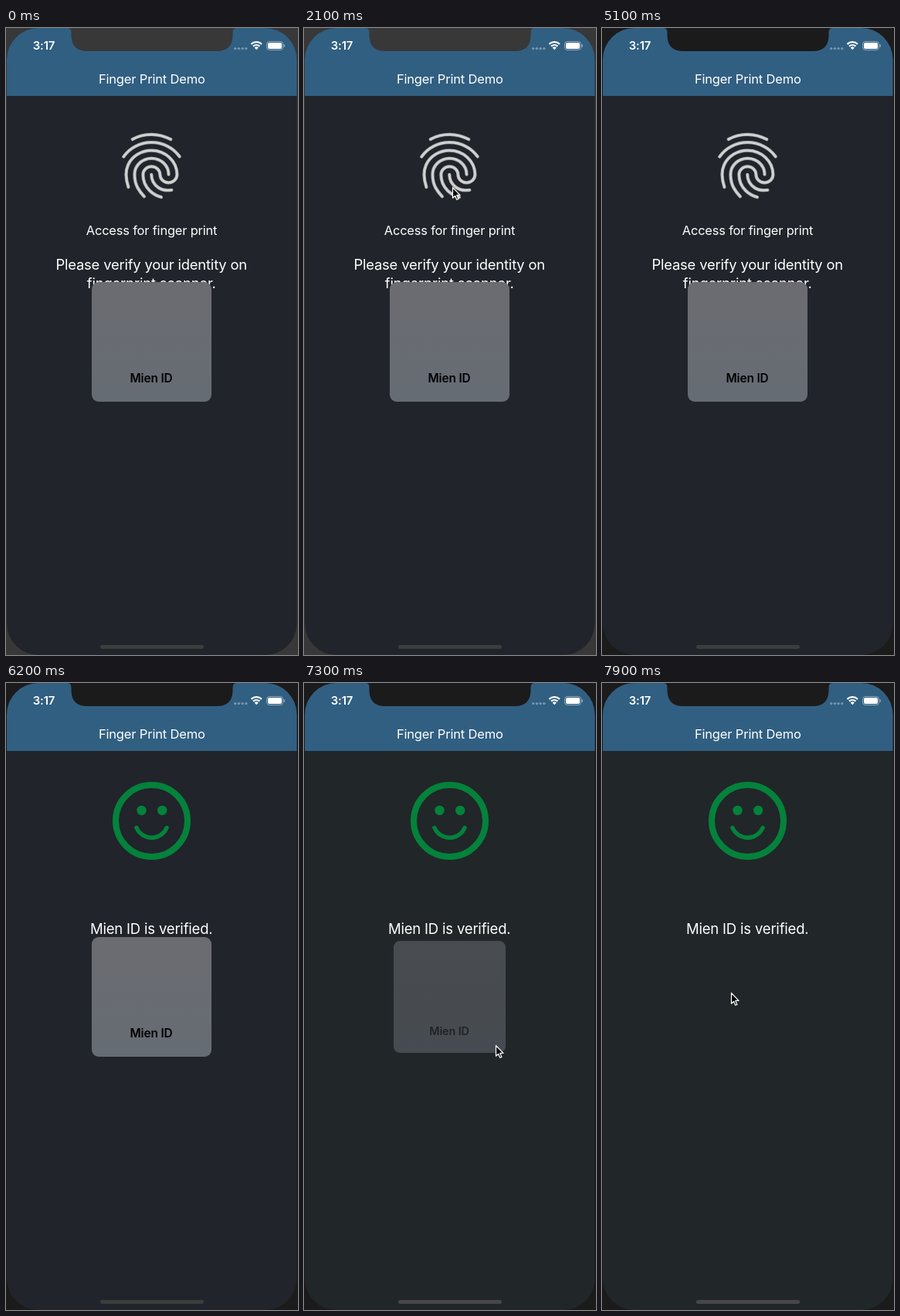
These frames come from a looping animation (378 px wide and 812 px high, 8000 ms). An HTML page with a canvas:

```html
<!DOCTYPE html>
<html lang="en">
<head>
<meta charset="utf-8">
<title>Finger Print Demo</title>
<style>
  html, body { margin: 0; width: 100%; height: 100%; overflow: hidden; background: #1b1b1b; }
  canvas { display: block; }
</style>
</head>
<body>
<canvas id="stage" width="378" height="812"></canvas>
<script>
const ctx = document.getElementById('stage').getContext('2d');
const W = 378, H = 812, LOOP = 8000, STEP = 100;
const VERIFIED = 6100, ACTIVE = 2200, DISMISS = 7100;

// Ridge centrelines on a 24-unit grid
const ridges = new Path2D(
  'M6.2 3.97C7.95 2.95 9.9 2.5 12 2.5C14 2.5 15.8 2.95 17.8 3.97' +
  'M3.5 9.22C4.45 7.9 5.6 6.85 7.05 6.1C10.1 4.5 13.9 4.5 16.92 6.1C18.35 6.83 19.5 7.85 20.48 9.2' +
  'M9.75 21.29C8.95 20.45 8.45 19.9 7.8 18.7C7.15 17.5 6.84 16.1 6.84 14.61' +
  'C6.84 11.91 9.15 9.72 12 9.72C14.85 9.72 17.16 11.91 17.16 14.61' +
  'M11.94 14.66C11.94 16.25 12.75 17.75 14.1 18.65C15 19.25 16.2 19.6 18.05 19.33' +
  'M4.96 18.45C4.5 17.1 4.27 15.9 4.27 14.66C4.27 13.5 4.5 12.55 4.9 11.64' +
  'C6.15 9 8.9 7.33 11.96 7.33C16.2 7.33 19.71 10.6 19.71 14.66' +
  'C19.71 16 18.56 17.1 17.13 17.1C15.7 17.1 14.55 16 14.55 14.66' +
  'C14.55 13.3 13.4 12.22 11.97 12.22C10.55 12.22 9.39 13.3 9.39 14.66' +
  'C9.39 16.5 10.1 18.25 11.41 19.52C12.4 20.5 13.4 21.05 14.91 21.5');
const notch = new Path2D('M80 0Q84.5 0 84.5 6V10Q85 30 105 30H273Q293 30 293.5 10V6Q293.5 0 298 0Z');
const arrow = new Path2D('M.5 .5V14.2L3.6 11.3L5.7 16.3L7.9 15.4L5.8 10.4H10Z');

// Pointer visits: [time, x, y]; each ends at its `until` time
const visits = [
  { until: 2500, keys: [[1400, 141, 339], [1500, 158, 300], [1600, 180, 255], [1700, 198, 222],
                        [1800, 192, 206], [2300, 192, 206], [2400, 131, 209]] },
  { until: 8000, keys: [[7200, 318, 500], [7300, 248, 469], [7700, 243, 420],
                        [7800, 212, 410], [7900, 167, 401]] }
];

function box(x, y, w, h, r, fill) {
  ctx.beginPath();
  ctx.roundRect(x, y, w, h, r);
  ctx.fillStyle = fill;
  ctx.fill();
}

function disc(x, y, r, fill) {
  ctx.beginPath();
  ctx.arc(x, y, r, 0, 7);
  ctx.fillStyle = fill;
  ctx.fill();
}

function arc(x, y, r, from, to, width, color) {
  ctx.beginPath();
  ctx.arc(x, y, r, from, to);
  ctx.lineWidth = width;
  ctx.strokeStyle = color;
  ctx.stroke();
}

function label(text, x, baseline, size, weight = 400, color = '#fff') {
  ctx.font = `${weight} ${size}px Inter, Roboto, sans-serif`;
  ctx.letterSpacing = `${-size / 100}px`;
  ctx.textAlign = 'center';
  ctx.fillStyle = color;
  ctx.fillText(text, x, baseline);
}

function statusBar() {
  label('3:17', 49, 28.3, 14.9, 600);
  for (let i = 0; i < 4; i++) disc(296.7 + i * 4.7, 26.6, 1.7, 'rgba(255,255,255,.35)');
  const up = -Math.PI / 2, spread = 0.74;
  ctx.lineCap = 'butt';
  for (const [r, width] of [[1.9, 3.8], [6.2, 2.2], [10, 2.2]])
    arc(324.2, 28.2, r, up - spread, up + spread, width, '#fff');
  ctx.beginPath();
  ctx.roundRect(337.5, 17.5, 21, 11, 3.5);
  ctx.lineWidth = 1;
  ctx.strokeStyle = 'rgba(255,255,255,.45)';
  ctx.stroke();
  box(339, 19, 18, 8, 2, '#fff');
  box(359.6, 21, 1.4, 4, 1, 'rgba(255,255,255,.45)');
}

function fingerprint() {
  ctx.save();
  ctx.translate(188.5, 178.5);
  ctx.scale(4.27, 4.27);
  ctx.translate(-12, -12);
  ctx.lineCap = 'round';
  for (const [width, color] of [[1, '#a3a5a6'], [0.6, '#d2d4d3']]) {
    ctx.lineWidth = width;
    ctx.strokeStyle = color;
    ctx.stroke(ridges);
  }
  ctx.restore();
}

function smiley() {
  const green = '#04823b';
  arc(188.5, 178.5, 46.5, 0, Math.PI * 2, 8, green);
  disc(175.5, 165, 6.2, green);
  disc(202.2, 165, 6.2, green);
  ctx.lineCap = 'round';
  arc(188.5, 179, 21.3, 0.41, Math.PI - 0.41, 5.5, green);
}

function panel(t) {
  const gone = Math.max(0, t - DISMISS);
  const alpha = 1 - gone / 430;
  if (alpha <= 0) return;
  const scale = 1 - gone * 0.00032;
  ctx.save();
  ctx.globalAlpha = alpha;
  ctx.translate(188.5, 406.5);
  ctx.scale(scale, scale);
  const shade = ctx.createLinearGradient(0, -77, 0, 77);
  shade.addColorStop(0, '#6b6c71');
  shade.addColorStop(1, '#666c74');
  box(-77.5, -77.5, 155, 155, 9, shade);
  label('Mien ID', -0.5, 52.5, 15.4, 600, '#000');
  ctx.restore();
}

function pointerAt(t) {
  for (const { until, keys } of visits) {
    if (t < keys[0][0] || t >= until) continue;
    const next = keys.findIndex(k => k[0] > t);
    if (next < 0) return keys.at(-1).slice(1);
    const [t0, x0, y0] = keys[next - 1], [t1, x1, y1] = keys[next];
    const p = (t - t0) / (t1 - t0);
    return [x0 + (x1 - x0) * p, y0 + (y1 - y0) * p];
  }
  return null;
}

function pointer(t) {
  const at = pointerAt(t);
  if (!at) return;
  ctx.save();
  ctx.translate(...at);
  ctx.lineJoin = 'round';
  ctx.lineWidth = 1.2;
  ctx.strokeStyle = '#fff';
  ctx.fillStyle = '#000';
  ctx.fill(arrow);
  ctx.stroke(arrow);
  ctx.restore();
}

function draw(t) {
  const frame = t < ACTIVE ? '#383838' : '#1b1b1b';
  ctx.fillStyle = frame;
  ctx.fillRect(0, 0, W, H);

  ctx.save();
  ctx.beginPath();
  ctx.roundRect(1, 0, 375.5, H, 41);
  ctx.clip();
  ctx.fillStyle = t < 6900 ? '#21242b' : '#212629';
  ctx.fillRect(0, 0, W, H);
  ctx.fillStyle = '#315f81';
  ctx.fillRect(0, 0, W, 88);
  ctx.restore();

  ctx.fillStyle = frame;
  ctx.fill(notch);
  statusBar();
  label('Finger Print Demo', 188.8, 72.3, 16.5);

  if (t < VERIFIED) {
    fingerprint();
    label('Access for finger print', 188.5, 267.5, 16.4);
    label('Please verify your identity on', 188.2, 313.3, 18.4);
    label('fingerprint scanner.', 188.2, 336.8, 18.4);
  } else {
    smiley();
    label('Mien ID is verified.', 188.2, 325, 18.5);
  }

  panel(t);
  box(122, 799, 134, 5, 2.5, t < 6900 ? '#3c3e3d' : '#454748');
  pointer(t);
}

function tick(now) {
  const t = now % LOOP;
  draw(t - t % STEP);
  requestAnimationFrame(tick);
}
requestAnimationFrame(tick);
</script>
</body>
</html>
```
